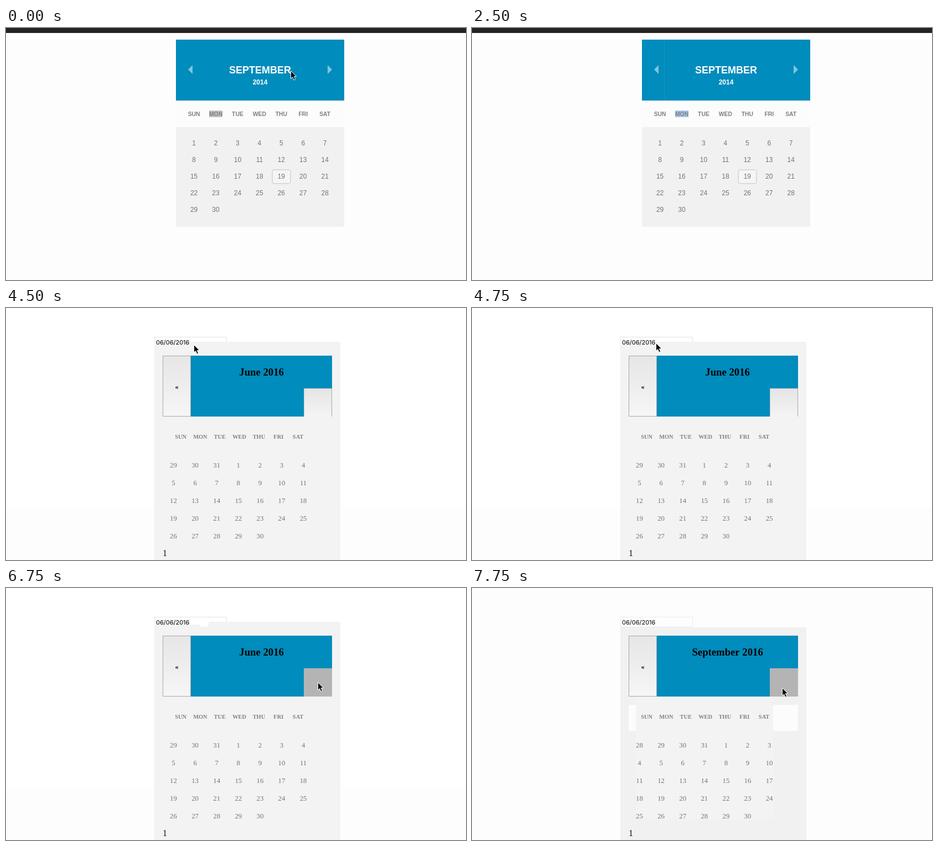
Animation, 831 px wide and 455 px high, one loop 8 s. Source, as an HTML page with a canvas:

```html
<!DOCTYPE html>
<html lang="en">
<head>
<meta charset="utf-8">
<title>Calendar picker</title>
<style>
html, body { margin: 0; width: 100%; height: 100%; overflow: hidden; background: #fdfdfd; }
canvas { display: block; }
</style>
</head>
<body>
<canvas id="stage" width="831" height="455"></canvas>
<script>
const ctx = document.getElementById('stage').getContext('2d');
const LOOP = 8000, STEP = 250;
const BLUE = '#008cbc', PANEL = '#f3f3f3', HATCH = '#f1f1f1';
const DIGIT = '#747474', HEAD = '#808080';
const SANS = '"Liberation Sans", Arial, sans-serif';
const SERIF = '"Liberation Serif", Times, serif';
const DAYS = ['SUN', 'MON', 'TUE', 'WED', 'THU', 'FRI', 'SAT'];

// Pointer turning points: time, x, y. Two visits, one per page.
const FIRST_VISIT = [[0, 514, 77], [500, 594, 80], [1000, 583, 73], [1250, 583, 73], [2250, 321, 76]];
const SECOND_VISIT = [[4000, 352, 72], [4750, 332, 63], [5000, 352, 69], [5250, 360, 132],
  [5750, 611, 136], [6000, 572, 139], [7000, 560, 180]];

function along(path, t) {
  const next = path.findIndex(p => p[0] > t);
  if (next < 0) return path[path.length - 1].slice(1);
  const [t0, x0, y0] = path[next - 1], [t1, x1, y1] = path[next];
  const k = (t - t0) / (t1 - t0);
  return [x0 + (x1 - x0) * k, y0 + (y1 - y0) * k];
}

function box(x, y, w, h, fill) {
  ctx.fillStyle = fill;
  ctx.fillRect(x, y, w, h);
}

function rounded(x, y, w, h, radii, fill) {
  ctx.beginPath();
  ctx.roundRect(x, y, w, h, radii);
  ctx.fillStyle = fill;
  ctx.fill();
}

function outline(color, width) {
  ctx.strokeStyle = color;
  ctx.lineWidth = width;
  ctx.stroke();
}

function label(str, x, y, font, color, align = 'center') {
  ctx.font = font;
  ctx.textAlign = align;
  ctx.fillStyle = color;
  ctx.fillText(str, x, y);
}

function shape(points, fill) {
  ctx.beginPath();
  points.forEach(([x, y]) => ctx.lineTo(x, y));
  ctx.closePath();
  ctx.fillStyle = fill;
  ctx.fill();
}

function frame(x, y, w, h, color) {
  ctx.beginPath();
  ctx.rect(x + 0.5, y + 0.5, w - 1, h - 1);
  outline(color, 1);
}

function shade(x, y, w, h, top, bottom) {
  const g = ctx.createLinearGradient(0, y, 0, y + h);
  g.addColorStop(0, top);
  g.addColorStop(1, bottom);
  box(x, y, w, h, g);
}

function pointer(x, y) {
  ctx.save();
  ctx.translate(Math.round(x) + 0.5, Math.round(y) + 0.5);
  shape([[0, 0], [0, 14], [3.2, 11], [5.4, 16.4], [8, 15.3], [5.8, 10], [10, 10]], '#000');
  outline('#fff', 1);
  ctx.restore();
}

// Calls put(day, column, row) for each cell and returns the number of cells.
function monthCells(year, month, put) {
  const first = new Date(year, month, 1).getDay();
  const total = first + new Date(year, month + 1, 0).getDate();
  for (let i = 0; i < total; i++) {
    put(new Date(year, month, i - first + 1).getDate(), i % 7, Math.floor(i / 7));
  }
  return total;
}

function blueCalendar(t) {
  box(0, 0, 831, 455, '#fdfdfd');
  box(0, 0, 831, 9, '#242424');
  box(307, 21, 304, 110, BLUE);
  if (t >= 2250) box(347, 22, 1, 109, 'rgba(255,255,255,.09)');
  shape([[329, 75], [337, 67], [337, 83]], '#80c5dd');
  shape([[589, 75], [581, 67], [581, 83]], '#80c5dd');
  label('SEPTEMBER', 459, 82, 'bold 18px ' + SANS, '#fff');
  label('2014', 459, 102, 'bold 12px ' + SANS, '#fff');

  box(307, 131, 304, 48, '#fcfcfc');
  box(367, 149, 24, 12, t < 250 ? '#c4c4c4' : '#a9c8ec');
  rounded(307, 179, 304, 180, [0, 0, 2, 2], HATCH);
  rounded(481, 256, 33, 25, 4, '#f5f5f5');
  outline('#d2d2d2', 1.5);

  const column = i => 339.6 + i * 39.43;
  DAYS.forEach((d, i) => label(d, column(i), 159, 'bold 10.4px ' + SANS, HEAD));
  for (let d = 0; d < 30; d++) {
    label(d + 1, column(d % 7), 212 + 30 * Math.floor(d / 7), '12px ' + SANS, DIGIT);
  }
}

function popup(t) {
  const fresh = t >= 7500;
  const month = 5 + Math.max(0, Math.floor((t - 7000) / STEP));
  const top = fresh ? 71 : 61;
  box(268, top, 336, 455 - top, fresh ? HATCH : PANEL);
  if (!fresh && t >= 5000) {
    box(333, 61, 33, 5, '#fff');
    box(351, 66, 14, 4, '#fff');
  }
  if (fresh) box(283, 211, 306, 47, '#fcfcfc');
  if (t >= 7750) box(296, 196, 248, 221, PANEL);

  box(283, 86, 306, 110, BLUE);
  shade(283, 86, 51, 110, '#e6e6e6', '#f6f6f6');
  frame(283, 86, 51, 110, '#a8a8a8');
  label('«', 308.5, 146, 'bold 12px ' + SERIF, '#000');
  if (t >= 6750) {
    box(538, 145, 51, 51, '#b4b4b4');
  } else {
    shade(538, 145, 51, 51, '#e5e5e5', '#f4f4f4');
    box(538, 145, 51, 1, '#c4c4c4');
    box(538, 145, 1, 51, '#c4c4c4');
    box(588, 145, 1, 51, '#a8a8a8');
  }

  const name = new Date(2016, month, 1).toLocaleString('en-US', { month: 'long' });
  label(name + ' 2016', 461.6, 122, 'bold 18.72px ' + SERIF, '#000');
  DAYS.forEach((d, i) => label(d, 315.6 + i * 35.33, 236, 'bold 10.4px ' + SERIF, HEAD));
  const total = monthCells(2016, month, (day, col, row) =>
    label(day, 302.5 + col * 39.1, 288 + row * 32, '12.8px ' + SERIF, DIGIT));
  if (total % 7) label('1', 283, 288 + 32 * Math.ceil(total / 7), '16px ' + SERIF, '#111', 'left');
}

function datePage(t) {
  const fresh = t >= 7500;
  box(0, 0, 831, 455, '#fdfdfd');
  if (!fresh) box(0, 0, 831, 359, '#fff');
  box(268, 52, 131, 19, fresh ? '#fdfdfd' : '#fff');
  frame(268, 52, 131, 19, fresh ? '#ebebeb' : '#e2e2e2');
  if (t >= 4250) popup(t);
  label('06/06/2016', 271, 66, '11px Inter, Roboto, sans-serif', '#000', 'left');
}

function draw(now) {
  const t = Math.floor((now % LOOP) / STEP) * STEP;
  (t < 3500 ? blueCalendar : datePage)(t);
  if (t < 2500) pointer(...along(FIRST_VISIT, t));
  if (t >= 4000) pointer(...along(SECOND_VISIT, t));
}

const start = performance.now();
function tick() {
  draw(performance.now() - start);
  requestAnimationFrame(tick);
}
tick();
</script>
</body>
</html>
```
